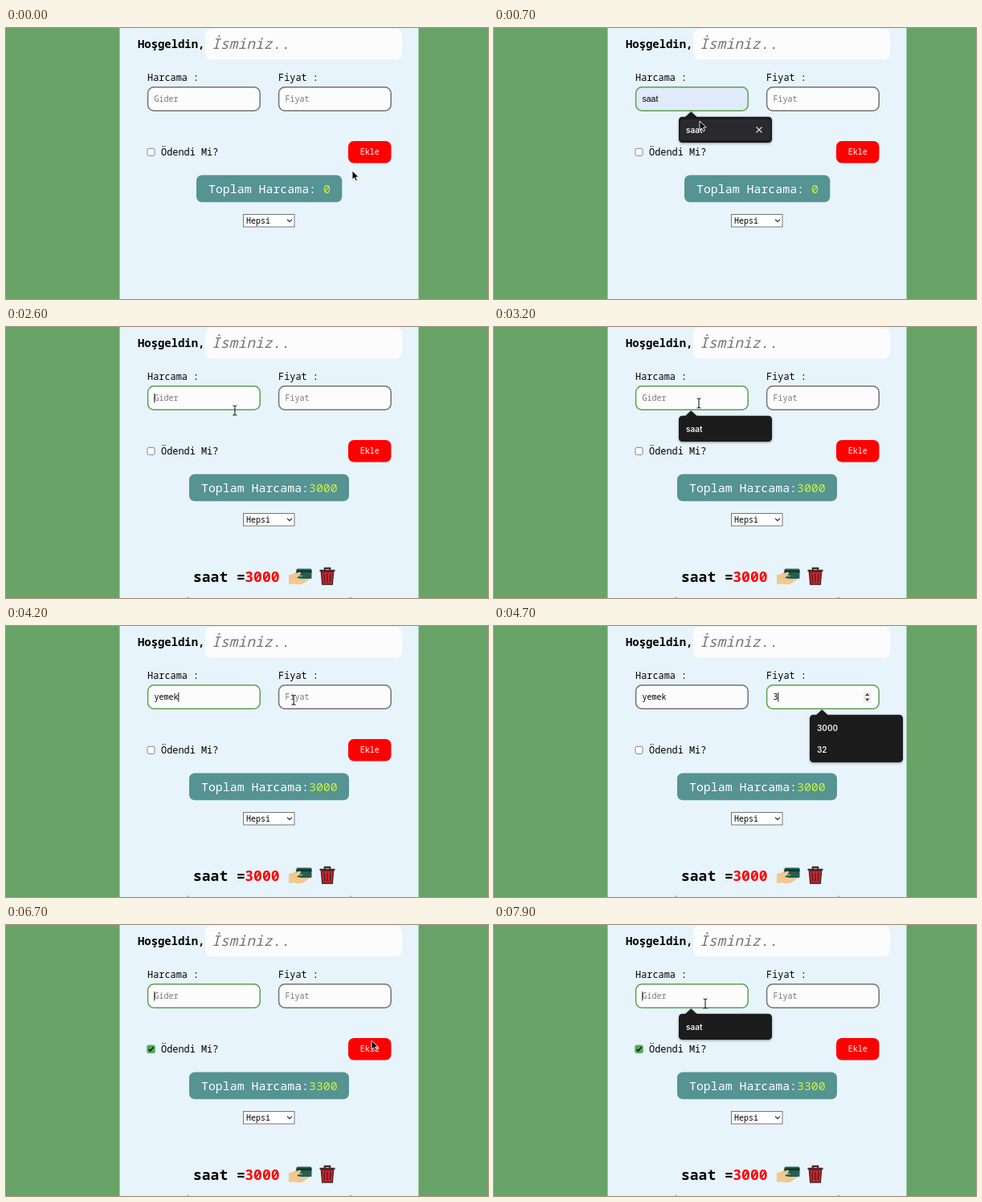
These frames come from a looping animation (600 by 338 pixels, 8000 ms). An HTML page:

```html
<!DOCTYPE html>
<html lang="tr">
<head>
<meta charset="utf-8">
<title>Harcama</title>
<style>
html, body { margin: 0; width: 100%; height: 100%; overflow: hidden; background: #68a368; }
svg { display: block; width: 600px; height: 338px; }
text { font-family: "Noto Sans Mono", "DejaVu Sans Mono", monospace; font-size: 10px; white-space: pre; }
.label { font-size: 11.9px; }
.total { font-size: 14.9px; }
.row { font-size: 18px; font-weight: 700; }
.item { font: 600 10px Inter, sans-serif; fill: #f2f2f2; }
</style>
</head>
<body>
<svg viewBox="0 0 600 338" xmlns="http://www.w3.org/2000/svg">
  <defs>
    <filter id="shadow" x="-20%" y="-20%" width="140%" height="150%">
      <feDropShadow dx="0" dy="1" stdDeviation="1.5" flood-opacity=".4"/>
    </filter>
  </defs>
  <rect width="600" height="338" fill="#68a368"/>
  <rect x="141.5" width="372" height="338" fill="#e8f4fb"/>
  <text x="164" y="24.5" font-weight="700" style="font-size:13.9px">Hoşgeldin,</text>
  <rect x="248" y="1" width="245" height="38.5" rx="8" fill="#fcfcfd"/>
  <text x="256" y="26" fill="#757575" font-style="italic" style="font-size:18px">İsminiz..</text>
  <text class="label" x="176" y="66">Harcama :</text>
  <text class="label" x="339" y="66">Fiyat :</text>
  <g id="fields"></g>
  <rect x="176" y="150.3" width="9" height="9" rx="1.5" fill="#fff" stroke="#767676" stroke-width=".9"/>
  <g id="tick">
    <rect x="175.5" y="149.8" width="10" height="10" rx="1.5" fill="#4caf50"/>
    <path d="M177.6 155l2 2.1 4-4.8" fill="none" stroke="#111" stroke-width="1.5"/>
  </g>
  <text class="label" x="193" y="159">Ödendi Mi?</text>
  <rect x="426" y="141" width="53.5" height="27.5" rx="7" fill="#f00"/>
  <text x="440.8" y="158" fill="#fff">Ekle</text>
  <rect id="totalBox" y="183.5" height="33.8" rx="7" fill="#569393"/>
  <text id="totalLabel" class="total" y="206" fill="#fff">Toplam Harcama:</text>
  <text id="totalValue" class="total" y="206" fill="#c8f53c"></text>
  <rect x="295.5" y="232.5" width="63.5" height="15.5" fill="#fff" stroke="#767676"/>
  <text x="299" y="244">Hepsi</text>
  <path d="M350 238.7l3 3 3-3" fill="none" stroke="#222" stroke-width="1.1"/>
  <g id="entry">
    <text class="row" x="233" y="318">saat =</text>
    <text class="row" x="297.3" y="318" fill="#f00">3000</text>
    <path d="M352 309l5-1 8-5c3-1 5 1 3 4l-3 3h10c4 0 4 4 1 6l-6 4c-4 2-8 1-12 0l-6 1z" fill="#f2c88f"/>
    <rect x="361.5" y="301.5" width="19" height="12.5" rx="1.5" fill="#245f50"/>
    <path d="M361.5 304.8h19" stroke="#12352e" stroke-width="2.6"/>
    <path d="M364 310.5h5" stroke="#8fc3aa" stroke-width="1.3"/>
    <path d="M357 310l7-4c3-1 4 1 2 3l-4 4c4 1 8 1 12 1-2 4-6 5-10 4l-7-1z" fill="#f2c88f"/>
    <path d="M392.3 305h15.4l-1.4 16h-12.6z" fill="#d3222f" stroke="#3a2525" stroke-width="1.3"/>
    <path d="M396 307.5l.6 11M400 307.5v11M404 307.5l-.6 11" stroke="#4a2024" stroke-width="1.4"/>
    <path d="M390.5 303.8h19M396.8 303v-2.2h6.4v2.2" fill="none" stroke="#442d2d" stroke-width="2.2"/>
    <path d="M225 338q.5-1 2.5-1M430 338q-.5-1-2.5-1" fill="none" stroke="#8d979c"/>
  </g>
  <g id="list" filter="url(#shadow)">
    <path d="M237.5 111.5l7.8-7.3 7.8 7.3z" fill="#1a1b1b"/>
    <rect id="listBox" x="230" y="110.8" width="116" rx="4.5" fill="#1a1b1b"/>
    <rect id="hover" x="232" width="112" height="26" rx="3" fill="#2c2c2d"/>
    <g id="items"></g>
    <path id="remove" d="M326.5 -3.5l7 7m0 -7l-7 7" stroke="#d8d8d8" stroke-width="1.2"/>
  </g>
  <path id="arrow" d="M0 0v11.2l2.6-2.4 1.8 4.1 2-.9-1.8-4h3.6z" fill="#000" stroke="#fff" stroke-width=".9"/>
  <path id="beam" d="M-2.5 -6q2.5 0 2.5 1.5q0-1.5 2.5-1.5M0 -5V5M-2.5 6q2.5 0 2.5-1.5q0 1.5 2.5 1.5" fill="none" stroke="#222" stroke-width="1.1"/>
</svg>
<script>
const LOOP = 8000;
const PRICE_SHIFT = 163;
const $ = id => document.getElementById(id);
const prices = ["3000", "32", "50", "20", "1500"];

// Each track is a list of [start time, value].
const tracks = {
  expense: [[0, ""], [900, "saat"], [2400, ""], [3500, "y"], [3620, "ye"], [3740, "yem"],
    [3870, "yeme"], [3980, "yemek"], [6700, ""]],
  price: [[0, ""], [1600, "3000"], [2400, ""], [4650, "3"], [4850, "30"], [5000, "300"], [6700, ""]],
  focus: [[0, ""], [400, "expense"], [1250, "price"], [2400, "expense"], [4250, "price"],
    [5650, ""], [6700, "expense"]],
  list: [[0, []], [450, ["saat"]], [900, []], [1300, prices], [1600, []], [2780, ["saat"]],
    [3500, []], [4300, prices], [4650, ["3000", "32"]], [4850, ["3000"]], [5650, []], [7600, ["saat"]]],
  total: [[0, "0"], [2400, "3000"], [6700, "3300"]]
};
const clicks = [2680, 7550];
const mouse = [[0, 431, 178], [100, 431, 178], [390, 250, 92], [480, 250, 92], [680, 256, 116],
  [920, 256, 116], [1220, 395, 92], [1320, 395, 92], [1520, 408, 126], [1600, 408, 126],
  [1700, 386, 125], [1850, 386, 125], [2250, 452, 154], [2420, 452, 154], [2660, 255, 95],
  [4040, 255, 95], [4230, 365, 92], [5150, 365, 92], [5620, 185, 153], [6050, 185, 153],
  [6550, 455, 144], [7250, 455, 144], [7530, 263, 98], [8000, 263, 98]];

const valueAt = (track, t) => track.filter(step => step[0] <= t).pop()[1];
const show = (el, on) => el.setAttribute("visibility", on ? "inherit" : "hidden");
const set = (el, attrs) => { for (const k in attrs) el.setAttribute(k, attrs[k]); };
const between = (t, a, b) => t >= a && t < b;

function make(parent, tag, attrs) {
  const el = document.createElementNS("http://www.w3.org/2000/svg", tag);
  set(el, attrs);
  return parent.appendChild(el);
}

function makeField(name, x, placeholder) {
  const group = make($("fields"), "g", {});
  const field = { name, x, placeholder };
  field.box = make(group, "rect", { x: x + .6, y: 73.8, width: 139.6, height: 29.4, rx: 7.5, "stroke-width": 1.5 });
  field.text = make(group, "text", { x: x + 8.5, y: 92 });
  field.caret = make(group, "path", { d: "M0 83v11.5", stroke: "#000", "stroke-width": .9 });
  return field;
}
const fields = [makeField("expense", 176, "Gider"), makeField("price", 339, "Fiyat")];
const spinner = make($("fields"), "g", {});
make(spinner, "rect", { x: 460, y: 82, width: 9.5, height: 13.5, fill: "#ececec" });
make(spinner, "path", { d: "M462 87l2.7-3.3 2.7 3.3zM462 90.4l2.7 3.3 2.7-3.3z", fill: "#444" });
const itemTexts = prices.map((_, i) => make($("items"), "text", { class: "item", x: 239, y: 130.8 + 27 * i }));

function mouseAt(t) {
  const i = Math.max(1, mouse.findIndex(p => p[0] > t));
  const [t0, x0, y0] = mouse[i - 1], [t1, x1, y1] = mouse[i];
  const u = (t - t0) / (t1 - t0), e = u * u * (3 - 2 * u);
  return [x0 + (x1 - x0) * e, y0 + (y1 - y0) * e];
}

function caretOn(t) {
  const starts = [tracks.expense, tracks.price, tracks.focus].flat().map(s => s[0]).concat(clicks);
  const last = Math.max(...starts.filter(s => s <= t));
  return (t - last) % 1000 < 500;
}

function drawField(field, state, t) {
  const { name, x } = field;
  const value = state[name], focused = state.focus === name;
  const preview = focused ? state.preview : "";
  const shown = preview || value;
  const filled = preview || (name === "expense" ? between(t, 900, 2400) : between(t, 1600, 2400));
  set(field.box, { fill: filled ? "#e1eafa" : "#fcfcfd", stroke: focused ? "#5ca04f" : "#737373" });
  field.text.textContent = shown || field.placeholder;
  field.text.setAttribute("fill", shown ? "#000" : "#757575");
  field.text.style.cssText = preview ? "font:10.5px 'Liberation Sans',Arial,sans-serif" : "";
  field.caret.setAttribute("transform", `translate(${x + 8.8 + 6 * value.length})`);
  show(field.caret, focused && !preview && caretOn(t));
}

function drawList(items, row, shift) {
  show($("list"), items.length > 0);
  $("list").setAttribute("transform", `translate(${shift})`);
  $("listBox").setAttribute("height", 5.2 + 27 * items.length);
  itemTexts.forEach((el, i) => { el.textContent = items[i] || ""; });
  show($("hover"), row >= 0);
  show($("remove"), row >= 0);
  $("hover").setAttribute("y", 114 + 27 * row);
  $("remove").setAttribute("transform", `translate(0 ${127 + 27 * row})`);
}

function drawTotal(total) {
  const wide = total.length > 1;
  set($("totalBox"), wide ? { x: 228, width: 199 } : { x: 237, width: 181.3 });
  $("totalLabel").setAttribute("x", wide ? 243 : 252);
  $("totalValue").setAttribute("x", wide ? 377 : 395);
  $("totalValue").textContent = total;
  show($("entry"), wide);
}

function drawMouse(x, y, t) {
  const typing = between(t, 3500, 4050) || between(t, 4650, 5160);
  const overField = y > 73 && y < 104 && fields.some(f => x > f.x && x < f.x + 140);
  show($("beam"), !typing && overField);
  show($("arrow"), !typing && !overField);
  for (const id of ["beam", "arrow"]) $(id).setAttribute("transform", `translate(${x} ${y})`);
}

function render(t) {
  const state = {};
  for (const key in tracks) state[key] = valueAt(tracks[key], t);
  const [x, y] = mouseAt(t);
  const shift = state.focus === "price" ? PRICE_SHIFT : 0;
  const left = 230 + shift;
  let row = x > left && x < left + 116 ? Math.floor((y - 113) / 27) : -1;
  if (row < 0 || row >= state.list.length) row = -1;
  state.preview = row < 0 ? "" : state.list[row];

  fields.forEach(field => drawField(field, state, t));
  show(spinner, state.focus === "price");
  show($("tick"), t >= 5650);
  drawTotal(state.total);
  drawList(state.list, row, shift);
  drawMouse(x, y, t);
}

const start = performance.now();
function tick() {
  render((performance.now() - start) % LOOP);
  requestAnimationFrame(tick);
}
tick();
</script>
</body>
</html>
```
